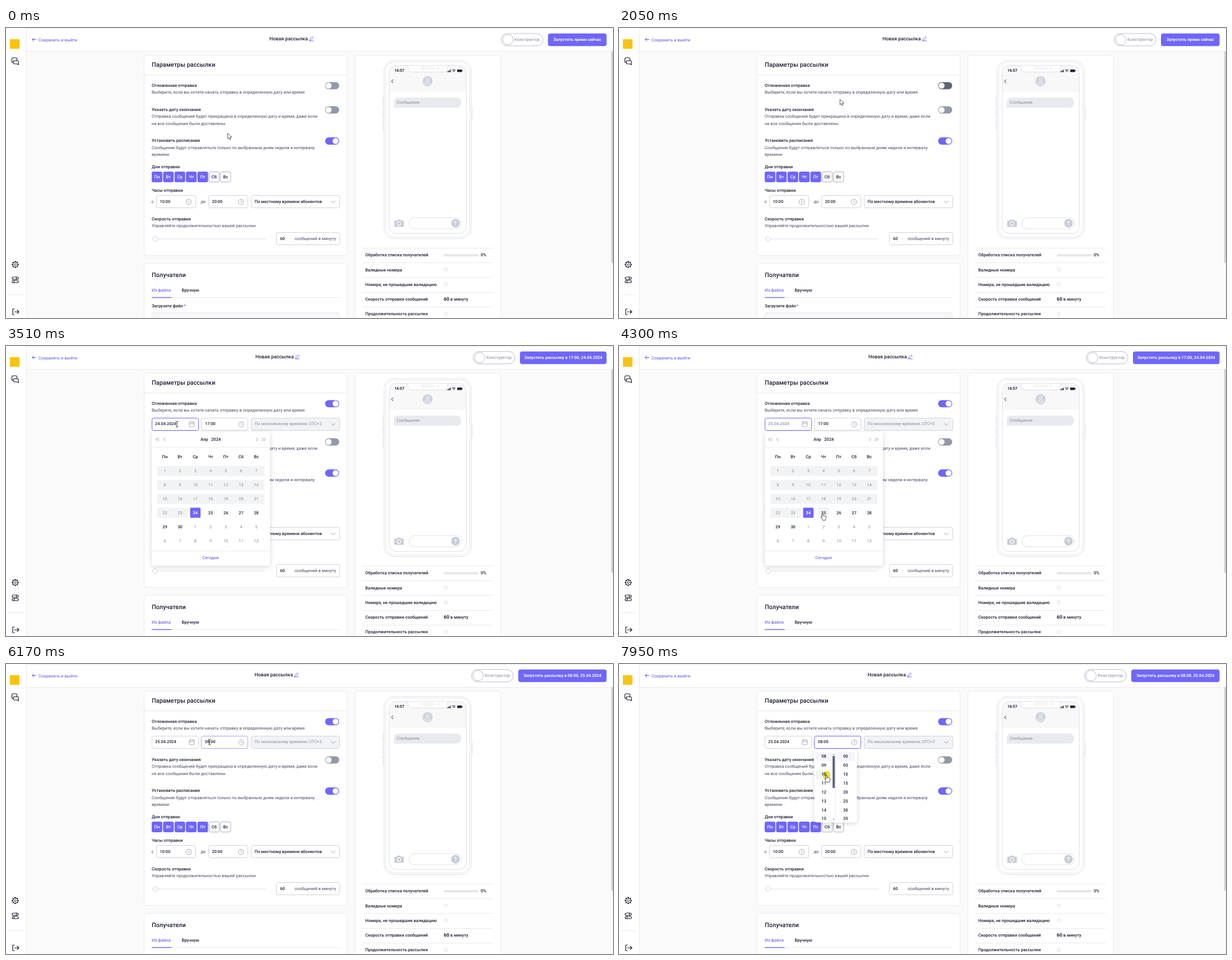
An HTML page for the animation above (8000 ms loop, 1083 px wide and 517 px high).

```html
<!DOCTYPE html>
<html lang="ru">
<head>
<meta charset="utf-8">
<title>Новая рассылка</title>
<style>
html, body { margin: 0; width: 100%; height: 100%; overflow: hidden; background: #fafafa; }
svg { display: block; width: 100vw; height: 100vh; }
text { font: 400 7.65px Roboto, Inter, sans-serif; fill: #434860; text-rendering: geometricPrecision; white-space: pre; }
.b { font-weight: 500; fill: #1a1d30; }
.d { font-weight: 500; font-size: 7.6px; fill: #1a1d30; }
.h { font-weight: 500; font-size: 10.9px; fill: #1a1d30; }
.t { font-weight: 500; font-size: 8.75px; fill: #1a1d30; }
.p { fill: #5a50e6; }
.g { fill: #858b9c; }
.n { font-size: 7.4px; }
.w { font-weight: 700; font-size: 7.3px; fill: #fff; }
.m { text-anchor: middle; }
.e { text-anchor: end; }
#click { mix-blend-mode: multiply; }
</style>
</head>
<body>
<svg id="stage" viewBox="0 0 1083 517" preserveAspectRatio="none"></svg>
<script>
const ACCENT = '#6f66fb', HOVER = '#a39dfc', DARK = '#1a1d30', LINE = '#e9eaee', FIELD = '#d0d3db', ICON = '#9096a6';

const text = (x, y, s, cls = '', more = '') => `<text x="${x}" y="${y}" class="${cls}" ${more}>${s}</text>`;
const rect = (x, y, w, h, r, fill, stroke = 'none', more = '') =>
  `<rect x="${x}" y="${y}" width="${w}" height="${h}" rx="${r}" fill="${fill}" stroke="${stroke}" ${more}/>`;
const circle = (x, y, r, fill, stroke = 'none', more = '') =>
  `<circle cx="${x}" cy="${y}" r="${r}" fill="${fill}" stroke="${stroke}" ${more}/>`;
const path = (d, stroke, width = 1, fill = 'none') =>
  `<path d="${d}" fill="${fill}" stroke="${stroke}" stroke-width="${width}" stroke-linecap="round" stroke-linejoin="round"/>`;
const group = (id, body, more = '') => `<g id="${id}" ${more}>${body}</g>`;
const hline = (x1, x2, y, color = LINE) => path(`M${x1} ${y}H${x2}`, color);
const list = (n, f) => Array.from({ length: n }, (_, i) => f(i)).join('');

const field = (x, y, w, id, fill = '#fff') => rect(x, y, w, 22, 3, fill, FIELD, id ? `id="${id}"` : '');
const clock = (x, y) => circle(x, y, 4.8, 'none', ICON, 'stroke-width=".8"') + path(`M${x} ${y - 3}v3l2 1.4`, ICON, .8);
const chevron = (x, y) => path(`M${x - 3.2} ${y - 1.5}l3.2 3.2 3.2-3.2`, ICON);
const toggle = (y, on, id = '') =>
  rect(569.3, y - 6.4, 25.2, 12.8, 6.4, on ? ACCENT : '#9299a9', 'none', id && `id="${id}"`) +
  circle(on ? 588 : 575.6, y, 5.3, '#fff', 'none', id && `id="${id}Knob"`);
const single = (x, y, dir) => path(`M${x} ${y - 2.7}l${dir * 2.7} 2.7 ${-dir * 2.7} 2.7`, '#7d8394', .8);
const double = (x, y, dir) => single(x, y, dir) + single(x + 3.4, y, dir);

const gear = list(8, i => `<path d="M16.5 415.4v2" stroke="${DARK}" stroke-width="2" transform="rotate(${i * 45} 16.5 421.7)"/>`) +
  circle(16.5, 421.7, 4.5, '#fff', DARK, 'stroke-width="1.2"') + circle(16.5, 421.7, 1.8, '#fff', DARK);

const sidebar = rect(0, 0, 36.5, 517, 0, '#fff') + path('M36.5 0V517', LINE) +
  rect(7, 20, 17, 17, 0, '#fdc20d') +
  rect(10.5, 53, 9, 8.5, 2, '#fff', DARK, 'stroke-width="1.2"') +
  path('M13.5 58.5h7q1.7 0 1.7 1.7v5.3l-2.4-1.5h-5q-1.7 0-1.7-1.7z', DARK, 1.2, '#fff') +
  gear +
  rect(11, 444, 11, 4, 2, '#fff', DARK, 'stroke-width="1.2"') + rect(11, 450, 11, 4, 2, '#fff', DARK, 'stroke-width="1.2"') +
  path('M18.5 444v4M14.5 450v4', DARK, 1.2) +
  hline(3, 30, 475.5) +
  path('M15 501h-3v10h3M15 506h7.5M20 503l3 3-3 3', DARK, 1.2);

const header = rect(36.5, 0, 1047, 41, 0, '#fff') + hline(37, 1083, 41.5) + hline(0, 1083, .5, '#e8e8eb') +
  path('M53.5 20.5H47M49.8 17.5l-3 3 3 3', '#5a50e6') + text(58, 23.5, 'Сохранить и выйти', 'p') +
  group('title', text(470, 22.3, 'Новая рассылка', 't') +
    path('M542 20l4.5-4.5 1.8 1.8-4.5 4.5-2.3.5zM541.5 23h7', '#5a50e6', .8)) +
  group('pill', rect(883.5, 9.8, 74.5, 22, 11, '#fff', '#b9bdc9') + circle(895.3, 20.8, 9.3, '#fff', '#b9bdc9') +
    text(907, 23, 'Конструктор', 'g')) +
  rect(967, 9.8, 104.5, 22.4, 4, ACCENT, 'none', 'id="button"') + text(1019, 23, '', 'w m', 'id="buttonText"');

const dayNames = ['Пн', 'Вт', 'Ср', 'Чт', 'Пт', 'Сб', 'Вс'];
const days = dayNames.map((s, i) => {
  const x = 260 + i * 20.4, on = i < 5;
  return rect(x + .4, 256.5, 18, 18, 2, on ? ACCENT : '#fff', on ? ACCENT : '#a9adba') +
    text(x + 9.4, 267.6, s, 'b m', on ? 'style="fill:#fff"' : '');
}).join('');

const lower = text(260, 147.7, 'Указать дату окончания', 'b') + toggle(146, false) +
  text(260, 160, 'Отправка сообщений будет прекращена в определенную дату и время, даже если') +
  text(260, 172.7, 'не все сообщения были доставлены') +
  text(260, 203.4, 'Установить расписание', 'b') + toggle(201.5, true) +
  text(260, 215.7, 'Сообщения будут отправляться только по выбранным дням недели и интервалу') +
  text(260, 228.2, 'времени') +
  text(260, 249.7, 'Дни отправки', 'b') + days +
  text(260, 291.7, 'Часы отправки', 'b') +
  text(259.5, 311.8, 'с') + field(268.5, 298.5, 70) + text(274.5, 311.8, '10:00', 'd n') + clock(326, 310) +
  text(347.5, 311.8, 'до') + field(361.5, 298.5, 70) + text(367.5, 311.8, '20:00', 'd n') + clock(419.3, 310) +
  field(437.5, 298.5, 158) + text(443.5, 311.8, 'По местному времени абонентов', 'd') + chevron(584, 310) +
  text(260, 343, 'Скорость отправки', 'b') + text(260, 355.3, 'Управляйте продолжительностью вашей рассылки') +
  rect(260, 375, 203, 2, 1, '#eeeff2') + circle(266, 376, 4.2, '#fff', '#d3d0f6') +
  field(482.5, 364.5, 113) + text(489, 377.7, '60', 'd n') + text(589, 377.7, 'сообщений в минуту', 'e') +
  rect(246.5, 419.5, 362, 140, 5, '#fff', LINE) +
  text(260, 444.3, 'Получатели', 'h') +
  text(260, 470, 'Из файла', 'p') + text(313.5, 470, 'Вручную', 'd') +
  hline(260, 595, 480.5) + path('M260.5 480.5H295', ACCENT, 1.4) +
  text(260, 498.4, 'Загрузите файл<tspan fill="#5a50e6" dx="1">*</tspan>', 'd') +
  rect(260.5, 507.5, 334, 60, 3, '#f8f8fa', '#d9dce3', 'stroke-dasharray="2 1.5"');

const calendarIcon = rect(327, 135.5, 9, 8.6, 1.5, 'none', ICON, 'stroke-width=".8"') +
  path('M327 138.6h9M329.3 134v2.5M333.7 134v2.5', ICON, .8);
const extra = field(260.5, 128.5, 83, 'dateField') + text(266, 141.4, '', 'd n', 'id="dateText"') + calendarIcon +
  field(348.5, 128.5, 83, 'timeField') + text(355, 141.4, '', 'd n', 'id="timeText"') + clock(419.8, 139.7) +
  field(437.5, 128.5, 158, '', '#f2f3f6') + text(443.5, 141.4, 'По московскому времени, UTC+3', 'g') + chevron(584, 139.7);

const settings = rect(246.5, 48.5, 362, 357, 5, '#fff', LINE, 'id="card"') +
  text(260, 69, 'Параметры рассылки', 'h') + hline(247, 608, 83.5) +
  text(260, 104.7, 'Отложенная отправка', 'b') + toggle(102.8, false, 'delay') +
  text(260, 117, 'Выберите, если вы хотите начать отправку в определенную дату или время') +
  group('extra', extra) + group('lower', lower);

const EDGE = '#dcdfe6';
const phone = [[672, 124, 15], [672, 143.5, 16], [672, 164, 16], [830, 139.5, 25]]
    .map(([x, y, h]) => rect(x, y, 2.2, h, 1, '#fff', EDGE, 'stroke-width=".8"')).join('') +
  rect(674.5, 58, 155.5, 317.5, 19, '#fff', EDGE) + rect(677.4, 61, 149.8, 311.5, 16.5, '#fff', EDGE, 'stroke-width=".8"') +
  path('M684 114V79q0-12 12-12H809q12 0 12 12V114z', 'none', 0, '#f8f8f9') +
  path('M714 67q3.5 0 3.5 4 0 7.5 7.5 7.5h55q7.5 0 7.5-7.5 0-4 3.5-4', EDGE, 1, '#fff') +
  rect(683.8, 66.7, 137.4, 299.6, 12, 'none', EDGE) +
  rect(740.5, 70, 23.5, 3, 1.5, '#fff', EDGE, 'stroke-width=".8"') + circle(771, 71.4, 1.5, '#fff', EDGE, 'stroke-width=".8"') +
  text(693, 78, '16:57', 'b', 'style="font-weight:700;font-size:6.9px"') +
  list(4, i => rect(787.2 + i * 1.7, 77.2 - i, 1.2, 1.5 + i, .3, DARK)) +
  path('M796 75q3-2.4 6 0M797.4 76.7q1.6-1.2 3.2 0', DARK, .9) + circle(799, 78, .7, DARK) +
  rect(805, 74, 8.6, 4.4, 1.2, DARK) + rect(814, 75.3, .8, 1.8, .3, DARK) +
  path('M690.5 92.2l-2.7 2.8 2.7 2.8', DARK) +
  circle(752.2, 94.8, 9, '#ced2da') + circle(752.2, 92, 2.5, 'none', '#fff', 'stroke-width=".9"') +
  path('M747 99.8q0-3.6 5.2-3.6t5.2 3.6z', '#fff', .9) +
  path('M700 124h103q9 0 9 9t-9 9H691q1.5-2 1-9 0-9 8-9z', 'none', 0, '#e8eaee') +
  text(697, 135.4, 'Сообщение', 'g') +
  path('M694 343.5h3.5l1.5-2h4.5l1.5 2h3.5q1.3 0 1.3 1.3v8.4q0 1.3-1.3 1.3H694q-1.3 0-1.3-1.3v-8.4q0-1.3 1.3-1.3z', 'none', 0, '#c9cdd6') +
  circle(701.2, 348.6, 3.3, 'none', '#fff', 'stroke-width="1.2"') +
  rect(719, 338, 93.6, 20, 10, '#fff', EDGE) + circle(802, 348, 7.7, '#c9cdd6') +
  path('M802 351.8v-7.5M799.3 347l2.7-2.8 2.7 2.8', '#fff');

const rows = ['Обработка списка получателей', 'Валидные номера', 'Номера, не прошедшие валидацию',
  'Скорость отправки сообщений', 'Продолжительность рассылки'];
const stats = rows.map((s, i) => hline(636, 868, Math.floor(392 + i * 26.4) + .5) + text(641, 407.2 + i * 26.3, s, 'd')).join('') +
  rect(781, 403, 62.5, 4.2, 2, '#e6e7eb') + text(847, 407.2, '0%', 'b') +
  [430.5, 457, 510].map(y => circle(784.6, y, 2.8, '#fff', '#dcdee5')).join('') +
  text(781, 486.3, '<tspan font-weight="700" font-size="8.5">60</tspan> в минуту', 'b');

const preview = rect(622.5, 48.5, 260, 500, 5, '#fff', LINE) + phone + stats;

const cells = list(42, i => {
  const x = 283.4 + (i % 7) * 27.2, y = 222.5 + Math.floor(i / 7) * 24.95, day = i % 30 + 1;
  const active = i > 22 && i < 30, picked = i === 23;
  return (picked ? rect(x - 9.3, y - 9, 18.6, 18, 1.5, ACCENT) : '') +
    (i === 24 ? rect(x - 9.3, y - 9, 18.6, 18, 1.5, '#f2f3f6', 'none', 'id="hoverDay"') : '') +
    text(x, y + 2.6, day, 'm n ' + (picked ? 'w' : active ? 'b' : 'g'));
});
const calendar = rect(260, 153, 211, 238.5, 4, '#fff', 'none', 'filter="url(#shadow)"') +
  double(269.6, 166.5, -1) + single(284, 166.5, -1) + single(446.4, 166.5, 1) + double(456.5, 166.5, 1) +
  text(347, 168.7, 'Апр', 'b') + text(366, 168.7, '2024', 'b') + hline(260, 471, 180.5) +
  dayNames.map((s, i) => text(283.4 + i * 27.2, 199.8, s, 'd m')).join('') +
  list(4, i => rect(270, 213.7 + i * 24.95, i < 3 ? 191 : 54.5, 18, 0, '#f2f3f5')) + cells +
  hline(260, 471, 365.5) + text(365, 380.3, 'Сегодня', 'p m');

const two = n => String(n).padStart(2, '0');
const clockList = rect(348.6, 153, 75.6, 129.3, 4, '#fff', 'none', 'filter="url(#shadow)"') +
  rect(351, 157, 29, 16, 2, '#f5f5fa') + rect(389, 157, 32, 16, 2, '#f5f5fa') +
  rect(351, 189.5, 29, 16, 2, '#f3f3f6', 'none', 'id="hoverHour"') +
  path('M386.5 153.5V282', LINE, .8) +
  list(8, i => text(365.6, 167.4 + i * 15.85, two(8 + i), 'd m') + text(404.3, 167.4 + i * 15.85, two(5 * i), 'd m')) +
  group('listBar', rect(381, 164, 4.2, 57, 0, '#5f687e') +
    path('M381.8 162l1.3-1.5 1.3 1.5zM381.8 276l1.3 1.5 1.3-1.5z', 'none', 0, '#2b2f40'));

const pointers = group('arrow', path('M0 0V9.4l2.2-2 1.6 3.6 1.7-.8-1.6-3.5h3z', '#333', .8, '#fff')) +
  group('beam', path('M-1.7-4.8h1.2l.5.5.5-.5h1.2M0-4.3v8.6M-1.7 4.8h1.2l.5-.5.5.5h1.2', '#222', .9)) +
  group('hand', path('M-1 .8q1-1.4 2 0v4l1.2-.5 1 .5 1-.2.8.7 1 .1q.7.7.5 2.2 0 2-1 3.2v1.8H.2v-1.3q-1.7-1.4-3-4.2 0-1.2 1.8.2z', '#222', .8, '#fff'));

const stage = document.getElementById('stage');
stage.innerHTML = `<defs><filter id="shadow" x="-20%" y="-20%" width="140%" height="140%">
  <feDropShadow dx="0" dy="2" stdDeviation="4" flood-color="#000" flood-opacity=".17"/></filter></defs>` +
  rect(0, 0, 1083, 517, 0, '#fafafa') + settings + preview + header + sidebar +
  rect(1080, 41, 3, 378, 1, '#cdcfd6', 'none', 'id="scroll"') +
  group('calendar', calendar) + group('clockList', clockList) +
  circle(0, 0, 7, '#f5ea3a', 'none', 'id="click"') + group('cursor', pointers);

const el = {};
stage.querySelectorAll('[id]').forEach(e => el[e.id] = e);
const set = (id, attrs) => { for (const k in attrs) el[id].setAttribute(k, attrs[k]); };
const show = (id, on) => set(id, { display: on ? 'inline' : 'none' });
const fade = (id, opacity) => { set(id, { opacity }); show(id, opacity > 0); };
const ramp = (t, a, b) => Math.min(1, Math.max(0, (t - a) / (b - a)));
const ease = p => p * p * (3 - 2 * p);
const within = (t, spans) => spans.some(([a, b]) => t >= a && t < b);

// time, x, y of the pointer hotspot
const route = [[50, 395.7, 188], [640, 582, 102], [1430, 582, 102], [2430, 305, 139.5], [3640, 305, 139.5], [4080, 363, 298],
  [4850, 363, 298], [5130, 376.5, 161], [5370, 363, 139], [7370, 363, 139], [7850, 370, 198]];
function pointerAt(t) {
  let i = route.findIndex(k => k[0] > t);
  if (i < 0) i = route.length;
  const a = route[Math.max(0, i - 1)], b = route[Math.min(i, route.length - 1)];
  const p = a === b ? 0 : ease(ramp(t, a[0], b[0]));
  return [a[1] + (b[1] - a[1]) * p, a[2] + (b[2] - a[2]) * p];
}

function render(t) {
  const delayed = t >= 2140, saved = t >= 5250;
  const left = saved ? 914 : delayed ? 917 : 967, move = left - 967;
  set('button', { x: left, width: 1071.5 - left });
  set('buttonText', { x: (left + 1071.5) / 2 });
  el.buttonText.textContent = saved ? 'Запустить рассылку в 08:00, 25.04.2024'
    : delayed ? 'Запустить рассылку в 17:00, 24.04.2024' : 'Запустить прямо сейчас';
  set('pill', { transform: `translate(${move})` });
  set('title', { transform: `translate(${move / 2})` });

  const shift = delayed ? 25 : 0;
  set('lower', { transform: `translate(0 ${shift})` });
  set('card', { height: 357 + shift });
  set('scroll', { height: delayed ? 363.5 : 378 });
  show('extra', delayed);
  set('delay', { fill: t < 580 ? '#9299a9' : !delayed ? '#5f6577' : t < 2760 ? '#655cf0' : ACCENT });
  set('delayKnob', { cx: 575.6 + 12.4 * ease(ramp(t, 2140, 2300)) });

  const hovering = t >= 4200;
  el.dateText.textContent = hovering ? '25.04.2024' : '24.04.2024';
  el.dateText.style.fill = hovering && !saved ? '#8f95a5' : DARK;
  el.timeText.textContent = saved ? '08:00' : '17:00';
  set('dateField', { stroke: within(t, [[3120, 4560]]) ? ACCENT : FIELD });
  set('timeField', { stroke: t >= 6450 ? ACCENT : t >= 5600 ? HOVER : FIELD });

  fade('calendar', ramp(t, 3320, 3470) * (1 - ramp(t, 5230, 5400)));
  show('hoverDay', t >= 4030);
  fade('clockList', ramp(t, 6450, 6620));
  show('hoverHour', t >= 7540);
  show('listBar', t >= 7540);

  const [x, y] = pointerAt(t), transform = `translate(${x} ${y})`;
  set('cursor', { transform });
  set('click', { transform });
  const beam = within(t, [[2260, 3740], [5220, 7500]]);
  const hand = within(t, [[570, 1480], [3900, 5220], [7500, 8000]]);
  show('beam', beam);
  show('hand', hand);
  show('arrow', !beam && !hand);
  show('click', within(t, [[1000, 1200], [3090, 3180], [4400, 4600], [6420, 6600], [7900, 8000]]));
}

function tick() {
  render(performance.now() % 8000);
  requestAnimationFrame(tick);
}
tick();
</script>
</body>
</html>
```
